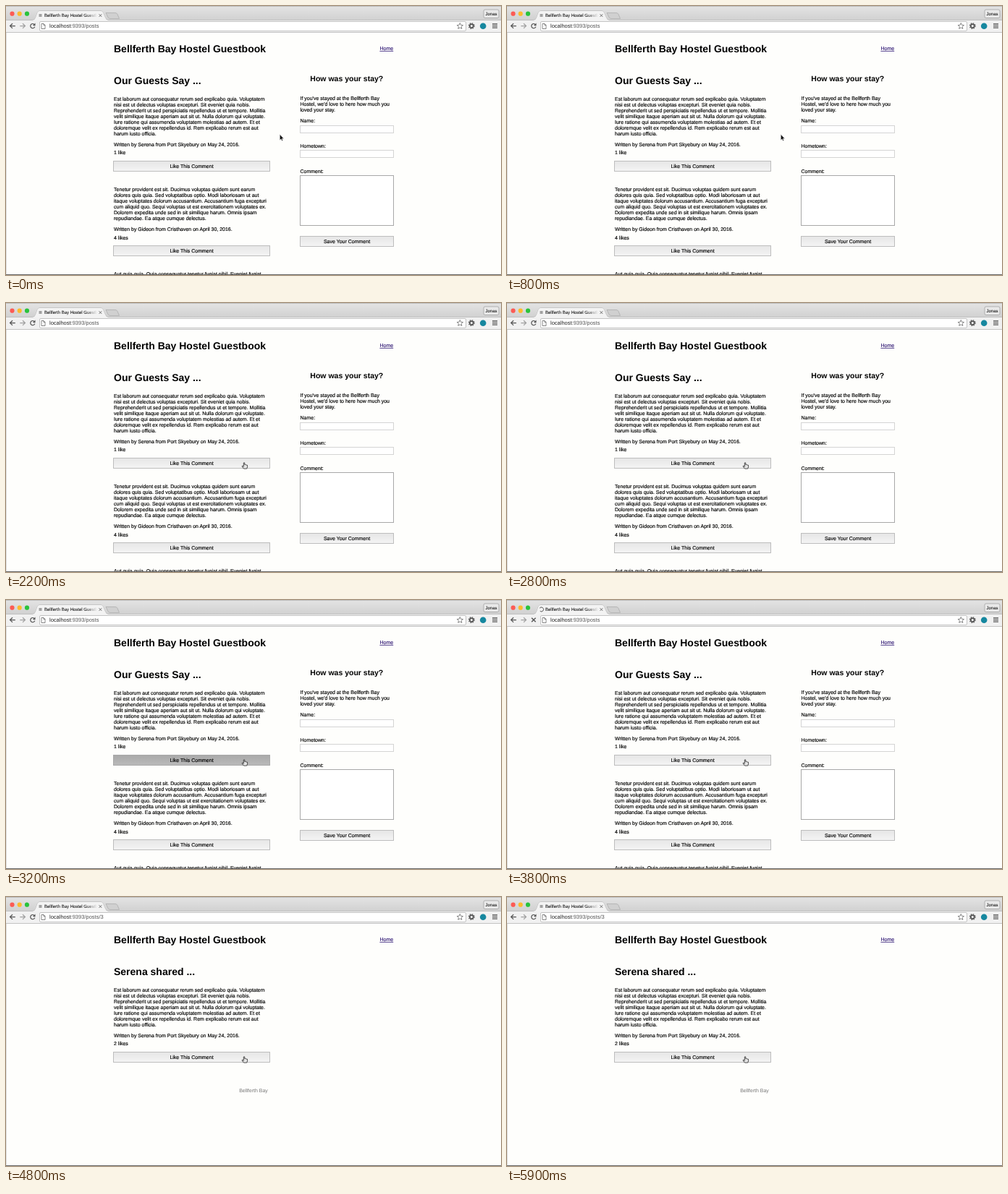
Animation, 684 px wide and 372 px high, one loop 6 s. Source, as an HTML page:

```html
<!DOCTYPE html>
<html lang="en">
<head>
<meta charset="utf-8">
<title>Guestbook</title>
<style>
html, body { margin: 0; width: 100%; height: 100%; overflow: hidden; background: #fefefc; }
svg { display: block; }
text { font: 7px "Liberation Sans", Arial, sans-serif; fill: #000; stroke: #000; stroke-width: .16px; text-rendering: geometricPrecision; white-space: pre; }
.h1 { font-size: 14px; font-weight: bold; stroke: none; }
.h2 { font-size: 10.5px; font-weight: bold; stroke: none; }
.mid { text-anchor: middle; }
.tab { font-size: 6px; fill: #222; stroke-width: .08px; }
.url { font-size: 7.5px; fill: #222; stroke: none; }
.dim { fill: #777; stroke: none; }
.url .dim { fill: #555; }
.link { fill: #2e1673; stroke: #2e1673; text-decoration: underline; }
.field { fill: #fff; stroke: #d4d4d4; }
.area { fill: #fff; stroke: #a8a8a8; }
.button { fill: url(#face); stroke: #bdbdbd; }
.pressed .button { fill: url(#down); stroke: #a8a8a8; }
.line { fill: none; stroke: #555; }
</style>
</head>
<body>
<svg width="684" height="372" viewBox="0 0 684 372">
  <defs>
    <linearGradient id="bar" x2="0" y2="1"><stop stop-color="#e4e4e4"/><stop offset="1" stop-color="#d0d0d0"/></linearGradient>
    <linearGradient id="face" x2="0" y2="1"><stop stop-color="#e6e6e6"/><stop offset="1" stop-color="#f4f4f4"/></linearGradient>
    <linearGradient id="down" x2="0" y2="1"><stop stop-color="#a9a9a9"/><stop offset="1" stop-color="#bababa"/></linearGradient>
    <linearGradient id="fade"><stop stop-color="#f3f3f3" stop-opacity="0"/><stop offset="1" stop-color="#f3f3f3"/></linearGradient>
    <clipPath id="tabClip"><rect x="52" y="7" width="74" height="12"/></clipPath>
  </defs>
  <rect width="684" height="372" fill="#fefefc"/>

  <!-- page contents -->
  <text class="link" x="516.5" y="61.2">Home</text>
  <g id="list"></g>
  <g id="single"></g>
  <g id="shared"></g>

  <!-- browser window -->
  <rect width="684" height="20" fill="url(#bar)"/>
  <path d="M0 .5H684" stroke="#bdbdbd"/>
  <path d="M138 9.5H151Q153 9.5 154 11.5L156.5 17.5H144Q142 17.5 141 15.5Z" fill="#d0d0d0" stroke="#aaa" stroke-width=".7"/>
  <rect y="19" width="684" height="18" fill="#f1f1f1"/>
  <path d="M0 19.5H37Q40 19 41 16L43.5 9Q44.5 6.8 46.5 6.8H131Q133 6.8 134 9L137 16Q138 19 141 19.5H684" fill="none" stroke="#b4b4b4" stroke-width=".8"/>
  <path d="M37 20Q40 19 41 16L43.5 9Q44.5 7 46.5 7H131Q133 7 134 9L137 16Q138 19 141 20Z" fill="#f3f3f3"/>
  <path d="M0 36.5H684" stroke="#c2c2c2"/>
  <circle cx="8.5" cy="10.7" r="3.1" fill="#fc5b54"/>
  <circle cx="18.7" cy="10.7" r="3.1" fill="#fdbb2d"/>
  <circle cx="29" cy="10.7" r="3.1" fill="#2ac33c"/>
  <rect x="660" y="5" width="21" height="11.5" rx="2" fill="#e9e9e9" stroke="#a2a2a2" stroke-width=".8"/>
  <text class="tab mid" x="670.5" y="12.8">Jonas</text>
  <rect id="favicon" x="45.5" y="11" width="4" height="4" fill="#a2a2a2"/>
  <path id="spinner" class="line" d="M3 0A3 3 0 1 1 0 -3" stroke-width=".9"/>
  <g clip-path="url(#tabClip)"><text id="tabTitle" class="tab" x="53" y="15.1"></text></g>
  <rect x="110" y="8" width="16" height="11" fill="url(#fade)"/>
  <path class="line" d="M128.5 11.2l3.8 3.8m0-3.8l-3.8 3.8" stroke-width=".8"/>
  <path class="line" d="M12.8 27.6H5.8M9 24.3L5.6 27.6L9 30.9" stroke-width="1.3"/>
  <path d="M19.3 27.6h7M23 24.3l3.4 3.3l-3.4 3.3" fill="none" stroke="#a0a0a0" stroke-width="1.3"/>
  <g id="reload"><path class="line" d="M39.4 25.8A3.1 3.1 0 1 0 39.8 28.7" stroke-width="1.2"/><path d="M40.5 23.6v3.6h-3.6z" fill="#555"/></g>
  <path id="stop" class="line" d="M34 24.7l5.6 5.6m0-5.6l-5.6 5.6" stroke-width="1.4"/>
  <rect x="46.5" y="21.5" width="589" height="13" rx="1.5" fill="#fff" stroke="#c4c4c4"/>
  <path class="line" d="M49 24.5h3l2 2v5h-5zM52 24.5v2h2" stroke-width=".7"/>
  <text class="url" x="60" y="30.2">localhost<tspan id="path" class="dim"></tspan></text>
  <path id="star" class="line" stroke-width=".7"/>
  <circle class="line" cx="643.3" cy="27.6" r="2.5" stroke-width="1.7"/>
  <circle class="line" cx="643.3" cy="27.6" r="3.8" stroke-width="1.3" stroke-dasharray="1.5 1.485"/>
  <circle cx="659.2" cy="27.7" r="4.3" fill="#16879f"/>
  <path class="line" d="M672 25h7M672 27.6h7M672 30.2h7" stroke-width="1.3"/>
  <g id="status">
    <rect x="-1" y="361.5" width="229" height="10" rx="1" fill="#e9e9e9" stroke="#b0b0b0" stroke-width=".8"/>
    <text x="2" y="368.2" style="font-size:5.9px">Waiting for localhost...</text>
  </g>
  <path d="M.25 37V372" stroke="#aaa" stroke-width=".5"/>
  <path d="M0 371.5H684" stroke="#656565"/>

  <path id="arrow" d="M0 0V8L1.8 6.4L3 9L4.3 8.4L3.1 5.9H5.6Z" fill="#111" stroke="#fff" stroke-width=".5"/>
  <path id="hand" d="M-.7 .6Q0-.5 .8 .6V3.2Q1.6 2.5 2.2 3.3Q3 2.8 3.5 3.6Q4.6 3.2 4.6 4.5V6.2L3.7 8.6H-.5L-2.8 5.6Q-3 4.4-1.9 4.8L-.7 5.8Z" fill="#e4e4e4" stroke="#222" stroke-width=".8"/>
</svg>
<script>
const $ = id => document.getElementById(id);
const LEFT = 149, RIGHT = 406.5, LEAD = 8, LOOP = 6000;
const MOVE = 1400, STILL = 1800, PRESS = 3100, LOAD = 3400, ARRIVE = 4100, DONE = 4800;
const START = [378.3, 177.6], END = [329, 220.5];

const label = (x, y, s, cls = '') => `<text class="${cls}" x="${x}" y="${y}">${s}</text>`;
const lines = (x, y, s) => s.split('|').map((l, i) => label(x, y + i * LEAD, l)).join('');
const box = (x, y, w, h, cls) => `<rect class="${cls}" x="${x}" y="${y}" width="${w}" height="${h}"/>`;
const button = (x, y, w, s) => box(x, y, w, 14, 'button') + label(x + w / 2, y + 9.3, s, 'mid');
const like = y => button(148.5, y, 216, 'Like This Comment');

$('shared').innerHTML =
  label(LEFT, 63.8, 'Bellferth Bay Hostel Guestbook', 'h1') +
  lines(LEFT, 130.9, 'Est laborum aut consequatur rerum sed explicabo quia. Voluptatem|nisi est ut delectus voluptas excepturi. Sit eveniet quia nobis.|Reprehenderit ut sed perspiciatis repellendus ut et tempore. Mollitia|velit similique itaque aperiam aut sit ut. Nulla dolorum qui voluptate.|Iure ratione qui assumenda voluptatem molestias ad autem. Et et|doloremque velit ex repellendus id. Rem explicabo rerum est aut|harum iusto officia.') +
  label(LEFT, 193.6, 'Written by Serena from Port Skyebury on May 24, 2016.') +
  `<g id="likeButton">${like(214.5)}</g>`;

$('list').innerHTML =
  label(LEFT, 107.8, 'Our Guests Say ...', 'h1') +
  label(LEFT, 205.4, '1 like') +
  lines(LEFT, 256, 'Tenetur provident est sit. Ducimus voluptas quidem sunt earum|dolores quis quia. Sed voluptatibus optio. Modi laboriosam ut aut|itaque voluptates dolorum accusantium. Accusantium fuga excepturi|cum aliquid quo. Sequi voluptas ut est exercitationem voluptates ex.|Dolorem expedita unde sed in sit similique harum. Omnis ipsam|repudiandae. Ea atque cumque delectus.') +
  label(LEFT, 311, 'Written by Gideon from Cristhaven on April 30, 2016.') +
  label(LEFT, 322.7, '4 likes') +
  like(331.5) +
  label(LEFT, 373, 'Aut quia quia. Quia consequatur tenetur fugiat nihil. Eveniet fugiat') +
  label(470.8, 103.8, 'How was your stay?', 'h2 mid') +
  lines(RIGHT, 130.4, "If you've stayed at the Bellferth Bay|Hostel, we'd love to here how much you|loved your stay.") +
  label(RIGHT, 161.4, 'Name:') + box(RIGHT, 165.5, 129, 10, 'field') +
  label(RIGHT, 196.2, 'Hometown:') + box(RIGHT, 199.5, 129, 10, 'field') +
  label(RIGHT, 230.8, 'Comment:') + box(RIGHT, 234.5, 129, 69, 'area') +
  button(RIGHT, 318.5, 129, 'Save Your Comment');

$('single').innerHTML =
  label(LEFT, 107.8, 'Serena shared ...', 'h1') +
  label(LEFT, 205.4, '2 likes') +
  label(342, 270.2, 'Bellferth Bay', 'mid dim');

$('star').setAttribute('d', 'M' + Array.from({ length: 10 }, (_, i) => {
  const a = i * Math.PI / 5, r = i % 2 ? 2 : 4.4;
  return [627.3 + r * Math.sin(a), 27.9 - r * Math.cos(a)];
}).join('L') + 'Z');

const show = (id, on) => $(id).style.display = on ? '' : 'none';

function draw(now) {
  const t = Math.floor(now % LOOP / 100) * 100;
  const loading = t >= LOAD && t < DONE, arrived = t >= ARRIVE;
  const waiting = loading && !arrived;

  show('list', !arrived);
  show('single', arrived);
  show('status', loading && arrived);
  show('reload', !loading);
  show('stop', loading);
  show('favicon', !waiting);
  show('spinner', waiting);
  $('spinner').setAttribute('transform', `translate(47.5 13) rotate(${-(t - LOAD) * .36})`);
  $('path').textContent = ':9393/posts' + (arrived ? '/3' : '');
  $('tabTitle').textContent = loading && arrived ? 'localhost:9393/posts/3' : 'Bellferth Bay Hostel Guestbook';
  $('likeButton').setAttribute('class', t >= PRESS && t < LOAD ? 'pressed' : '');

  const p = Math.min(1, Math.max(0, (t - MOVE) / (STILL - MOVE)));
  const ease = p * p * (3 - 2 * p);
  const [x, y] = START.map((s, i) => s + (END[i] - s) * ease);
  const over = x < 364.5 && y > 214;
  for (const id of ['arrow', 'hand']) $(id).setAttribute('transform', `translate(${x} ${y})`);
  show('arrow', !over);
  show('hand', over);
}

const begin = performance.now();
(function tick() {
  draw(performance.now() - begin);
  requestAnimationFrame(tick);
})();
</script>
</body>
</html>
```
